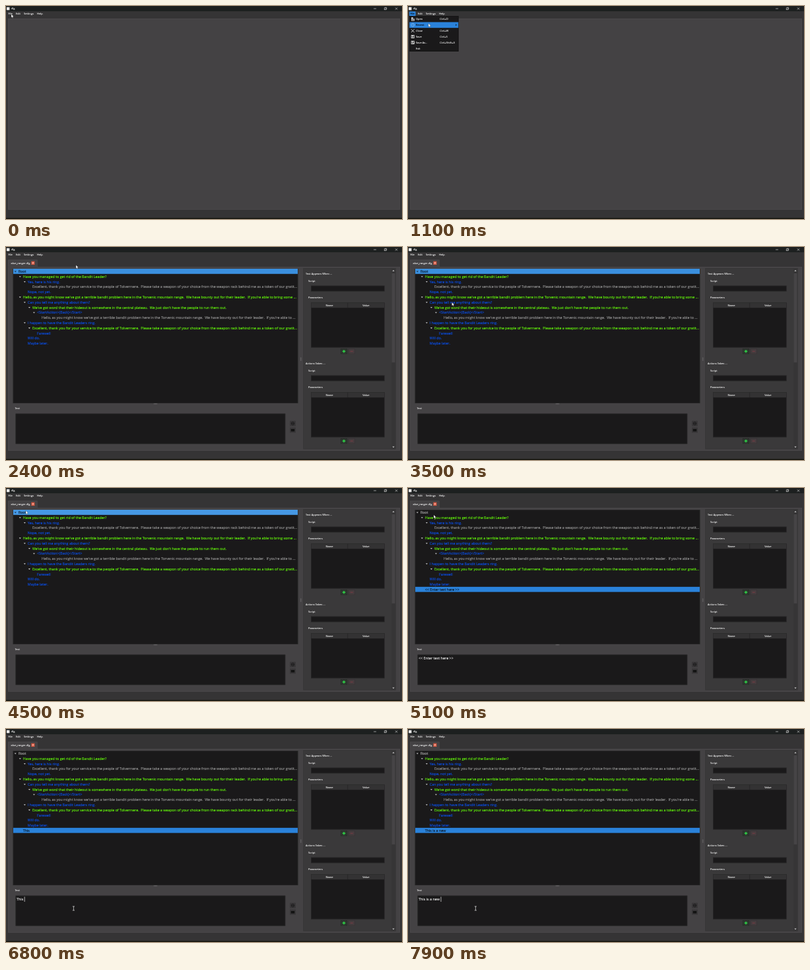
Write an HTML page with a canvas that moves like this. It is 600 px wide and 323 px high and loops after 8000 ms.

```html
<!DOCTYPE html>
<html lang="en">
<head>
<meta charset="utf-8">
<title>dlg</title>
<style>
html, body { margin: 0; width: 100%; height: 100%; overflow: hidden; background: #353435; }
canvas { display: block; width: 600px; height: 323px; }
</style>
</head>
<body>
<canvas id="stage" width="600" height="323"></canvas>
<script>
const ctx = document.getElementById('stage').getContext('2d');
const LOOP = 8000, STEP = 100;
const UI = 4, TREE = 5.35, ROW = 7.79;
const BLUE = '#2a82da', BASE = '#1a191a', PANE = '#444244', WINDOW = '#353435', PANEL = '#3a393a';
const GREEN = '#66ff0a', REPLY = '#0a50ee', GREY = '#9a9a9a', LIGHT = '#e6e6e6', INK = '#08131f';

// Pointer path: time, x, y
const PATH = [
  [0, 8, 12.5], [600, 8, 12.5], [700, 10, 14.5], [800, 15, 18], [900, 15, 18],
  [1000, 24, 22], [1100, 31, 26.5], [1800, 70, 27], [2300, 106, 27.4], [2500, 106, 27.4],
  [2800, 147, 100], [3000, 122, 165], [3300, 122, 165], [3700, 11, 3], [3800, 11, 3],
  [4300, 30, 34.4], [4500, 30, 34.4], [5300, 42, 43], [5700, 102.4, 272]
];

const EXCELLENT = 'Excellent, thank you for your service to the people of Tolvermere.  Please take a weapon of your choice from the weapon rack behind me as a token of our gratit...';
const HELLO = "Hello, as you might know we've got a terrible bandit problem here in the Torvenic mountain range.  We have bounty out for their leader.  If you're able to ";
// depth, colour, has children, text
const ROWS = [
  [0, '#b4b4b4', 1, 'Root'],
  [1, GREEN, 1, 'Have you managed to get rid of the Bandit Leader?'],
  [2, REPLY, 1, 'Yes, here is his ring.'],
  [3, GREY, 0, EXCELLENT],
  [2, REPLY, 0, 'Nope, not yet.'],
  [1, GREEN, 1, HELLO + 'bring some ...'],
  [2, REPLY, 1, 'Can you tell me anything about them?'],
  [3, GREEN, 1, "We've got word that their hideout is somewhere in the central plateau.  We just don't have the people to run them out."],
  [4, REPLY, 1, '<StartAction>(Back)</Start>'],
  [5, GREY, 0, HELLO + '...'],
  [2, REPLY, 1, 'I happen to have the Bandit Leaders ring.'],
  [3, GREEN, 1, EXCELLENT],
  [4, REPLY, 0, 'Farewell'],
  [2, REPLY, 0, 'Will do.'],
  [2, REPLY, 0, 'Maybe later.']
];
const MENU = [['Open', 'Ctrl+O'], ['Recent', ''], ['Close', 'Ctrl+W'],
  ['Save', 'Ctrl+S'], ['Save As...', 'Ctrl+Shift+S'], ['Exit', '']];
const HOME = 'C:/Users/hadlo/projects/rollnw/';
const RECENT = ['tests/test_data/user/development/alue_ranger.dlg', 'build/tests/tmp/alue_ranger.dlg',
  'build/tests/tmp/alue_ranger.dlg.json', 'tests/test_data/user/development/dlg_with_params.dlg'];
const HINT = '<< Enter text here >>', TYPED = 'This is a new ';

function rect(x, y, w, h, fill, stroke) {
  ctx.fillStyle = fill;
  ctx.fillRect(x, y, w, h);
  if (stroke) {
    ctx.strokeStyle = stroke;
    ctx.lineWidth = 0.6;
    ctx.strokeRect(x + 0.3, y + 0.3, w - 0.6, h - 0.6);
  }
}

function line(points, color, width = 0.7) {
  ctx.strokeStyle = color;
  ctx.lineWidth = width;
  ctx.beginPath();
  points.forEach(([x, y]) => ctx.lineTo(x, y));
  ctx.stroke();
}

function shape(points, fill) {
  ctx.fillStyle = fill;
  ctx.beginPath();
  points.forEach(([x, y]) => ctx.lineTo(x, y));
  ctx.closePath();
  ctx.fill();
}

function ring(x, y, r, color) {
  ctx.strokeStyle = color;
  ctx.lineWidth = 0.7;
  ctx.beginPath();
  ctx.arc(x, y, r, 0, 7);
  ctx.stroke();
}

function cross(x, y, r, color, width) {
  line([[x - r, y - r], [x + r, y + r]], color, width);
  line([[x - r, y + r], [x + r, y - r]], color, width);
}

// Large font scaled down keeps fractional glyph advances; y is the middle of the line.
function text(s, x, y, color = LIGHT, size = UI, align = 'left') {
  ctx.save();
  ctx.translate(x, y + size * 0.36);
  ctx.scale(0.1, 0.1);
  ctx.font = `${size * 10}px "Open Sans", "Noto Sans", sans-serif`;
  ctx.textAlign = align;
  ctx.fillStyle = ctx.strokeStyle = color;
  ctx.lineWidth = 1.2;
  ctx.lineJoin = 'round';
  ctx.fillText(s, 0, 0);
  ctx.strokeText(s, 0, 0);
  const w = ctx.measureText(s).width / 10;
  ctx.restore();
  return w;
}

function pointerAt(t) {
  const i = PATH.findIndex(p => p[0] > t);
  if (i < 0) return PATH[PATH.length - 1].slice(1);
  const [a, b] = [PATH[i - 1], PATH[i]];
  const k = (t - a[0]) / (b[0] - a[0]);
  return [a[1] + (b[1] - a[1]) * k, a[2] + (b[2] - a[2]) * k];
}

function drawWindow(menuOpen) {
  rect(0, 0, 600, 323, WINDOW);
  rect(0, 0, 600, 8, '#1d2020');
  rect(0, 321.5, 600, 1.5, '#15140c');
  rect(1, 1.7, 4.4, 4.6, '#e8e8e8');
  text('dlg', 7.8, 4);
  line([[557, 4], [561, 4]], '#ddd', 0.6);
  ctx.strokeStyle = '#ddd';
  ctx.lineWidth = 0.6;
  ctx.strokeRect(573.2, 2.9, 2.8, 2.8);
  line([[574.2, 2.3], [576.7, 2.3], [576.7, 5]], '#ddd', 0.5);
  cross(591.5, 4, 1.6, '#ddd', 0.6);
  if (menuOpen) rect(2, 8.3, 9.5, 7, BLUE);
  text('File', 3.4, 11.8, menuOpen ? INK : LIGHT);
  text('Edit', 14.8, 11.8);
  text('Settings', 27, 11.8);
  text('Help', 47, 11.8);
}

function menuIcon(i, x, y) {
  const c = '#e6e6e6';
  if (i === 0) {
    shape([[x - 2, y - 2.6], [x + 0.4, y - 2.6], [x + 0.4, y - 0.6], [x + 2.6, y - 0.6], [x + 2.6, y + 2.6], [x - 2, y + 2.6]], c);
    ring(x + 0.3, y + 0.8, 1.1, BASE);
  } else if (i === 1) {
    ring(x, y, 2.4, '#8fc0ef');
    line([[x, y - 1.4], [x, y], [x + 1.2, y + 0.5]], '#8fc0ef', 0.5);
  } else if (i === 2) {
    cross(x, y, 2.4, c, 0.9);
  } else if (i < 5) {
    ctx.strokeStyle = c;
    ctx.lineWidth = 0.8;
    ctx.strokeRect(x - 2.1, y - 2.1, 4.2, 4.2);
    rect(x - 1.2, y - 1.8, 2.2, 1.3, c);
    ring(x, y + 0.8, 0.7, c);
    if (i === 4) line([[x + 0.4, y + 2.6], [x + 2.9, y]], c, 1);
  }
}

function drawMenu(px, py, subOpen) {
  rect(2, 15.3, 74.5, 53.7, BASE, '#0e0e0e');
  const hot = px > 77 ? 1 : Math.floor((py - 15.6) / 8.85);
  MENU.forEach(([label, keys], i) => {
    const y = 19.9 + i * 8.85, on = i === hot;
    if (on) rect(2.2, y - 4.3, 74.1, 8.7, BLUE);
    const c = on ? INK : LIGHT;
    menuIcon(i, 7.2, y);
    text(label, 12, y, c);
    text(keys, 48.3, y, c, 4.2);
    if (i === 1) shape([[72.3, y - 1.4], [73.8, y], [72.3, y + 1.4]], c);
  });
  if (!subOpen) return;
  rect(77, 23.8, 184.3, 34.2, BASE, '#0e0e0e');
  RECENT.forEach((path, i) => {
    const y = 28.2 + i * 8.6, on = px > 77 && i === 0;
    if (on) rect(77.2, y - 4.2, 184, 8.3, BLUE);
    const c = on ? INK : LIGHT;
    text(`${i + 1} - ${HOME}${path}`, 86, y, c);
    line([[86, y + 2.1], [88.2, y + 2.1]], c, 0.4);
  });
}

function drawTree(rowText, hover) {
  rect(10.7, 33, 431.6, 204, BASE, '#2b2a2b');
  const added = rowText !== null;
  const rows = added ? ROWS.concat([[1, GREEN, 0, rowText]]) : ROWS;
  const selected = added ? rows.length - 1 : 0;
  rows.forEach(([depth, color, parent, label], i) => {
    const x = 18.7 + depth * 7.06, y = 37.2 + i * ROW, on = i === selected;
    if (on) rect(11, y - 4.2, 431, ROW, added ? BLUE : hover ? '#4698e4' : '#3a8fde');
    if (parent) shape([[x - 6, y - 0.8], [x - 3, y - 0.8], [x - 4.5, y + 1]], on ? '#1a2a3a' : '#cccccc');
    text(label, x, y, on ? INK : color, TREE);
  });
}

function drawGroup(title, y) {
  text(title, 454, y);
  text('Script', 458, y + 11);
  rect(462, y + 18.5, 111.5, 8.5, BASE, '#2c2b2c');
  text('Parameters', 458, y + 36.6);
  rect(462, y + 44.2, 111.5, 68, BASE, '#2c2b2c');
  rect(462.4, y + 44.5, 110.7, 7.5, '#333233');
  line([[517.7, y + 44.5], [517.7, y + 52]], '#222', 0.6);
  text('Name', 490, y + 48.4, LIGHT, UI, 'center');
  text('Value', 545.3, y + 48.4, LIGHT, UI, 'center');
  rect(507, y + 113.8, 10, 8.2, '#2d382f', '#262826');
  rect(518.8, y + 113.8, 10, 8.2, '#453c3e', '#323032');
  line([[509.7, y + 118], [514.3, y + 118]], '#2fe84a', 1.2);
  line([[512, y + 115.7], [512, y + 120.3]], '#2fe84a', 1.2);
  line([[521.8, y + 118], [525.8, y + 118]], '#7a3a44', 1);
}

function drawDocument() {
  rect(3, 30, 594, 279, PANE, '#4e4c4e');
  rect(3, 19.5, 44.5, 11, PANE, '#4e4c4e');
  rect(3.6, 29.5, 43.3, 1.6, PANE);
  text('alue_ranger.dlg', 7.6, 24.4);
  rect(38.4, 21.7, 5, 5.2, '#d9573f');
  cross(40.9, 24.3, 1.2, '#fff', 0.6);
  for (let i = -1; i < 2; i++) {
    rect(226 + i * 1.8, 237.3, 1, 1, '#8a888a');
    rect(446.3, 169.5 + i * 1.8, 1, 1, '#8a888a');
  }
  text('Text', 13.4, 245);
  rect(14.6, 252.7, 408.6, 45.8, BASE, '#2b2a2b');
  rect(430, 263.5, 9, 8.2, '#383638');
  rect(430, 273.5, 9, 8.2, '#383638');
  ring(434.5, 267.6, 2.2, '#121212');
  line([[432.8, 267.6], [436.2, 267.6]], '#121212', 0.8);
  rect(431.8, 276, 5.4, 3.6, '#121212');
  rect(450.5, 32, 140, 274.5, PANEL, '#353435');
  drawGroup('Text Appears When ...', 40.2);
  drawGroup('Actions Taken ...', 176.2);
  rect(584, 32.4, 6, 273.7, '#363536');
  rect(584.5, 40, 5, 135, '#464446');
  shape([[585.4, 36.7], [587, 34.7], [588.6, 36.7]], '#ccc');
  shape([[585.4, 302.5], [587, 304.5], [588.6, 302.5]], '#ccc');
}

function drawEditor(content, selected, caret) {
  if (content === null) return;
  if (selected) rect(15.6, 254, 55.6, 8, BLUE);
  const w = text(content, 15.9, 258, selected ? INK : '#eeeeee', 5.45);
  if (caret) line([[16.4 + w, 254.4], [16.4 + w, 262]], '#f4f4f4', 0.7);
}

function drawPointer(x, y) {
  if (y > 253) {
    line([[x, y - 3], [x, y + 3]], '#e4e4e4', 0.7);
    line([[x - 1.6, y - 3], [x + 1.6, y - 3]], '#e4e4e4', 0.7);
    line([[x - 1.6, y + 3], [x + 1.6, y + 3]], '#e4e4e4', 0.7);
    return;
  }
  const tip = [[0, 0], [0, 5], [1.1, 4], [1.9, 5.8], [2.8, 5.4], [2, 3.7], [3.6, 3.6]].map(([a, b]) => [x + a, y + b]);
  shape(tip, '#ffffff');
  line(tip.concat([tip[0]]), '#222', 0.25);
}

function typedCount(t) {
  if (t < 7100) return 1 + Math.floor((t - 6200) / 133);
  return Math.min(TYPED.length, 8 + Math.floor((t - 7100) / 100));
}

function draw(t) {
  const [px, py] = pointerAt(t);
  const loaded = t >= 2400, menuOpen = t >= 600 && !loaded;
  const typing = t >= 6200;
  const content = t < 5100 ? null : typing ? TYPED.slice(0, typedCount(t)) : HINT;
  drawWindow(menuOpen);
  if (loaded) {
    drawDocument();
    drawTree(content, t >= 4200);
    drawEditor(content, !typing && t >= 5400, typing);
  } else {
    rect(3, 19, 594, 290, PANE, '#4e4c4e');
  }
  if (menuOpen) drawMenu(px, py, t >= 1300);
  drawPointer(px, py);
}

function tick(now) {
  draw(Math.floor((now % LOOP) / STEP) * STEP);
  requestAnimationFrame(tick);
}
draw(0);
requestAnimationFrame(tick);
</script>
</body>
</html>
```
